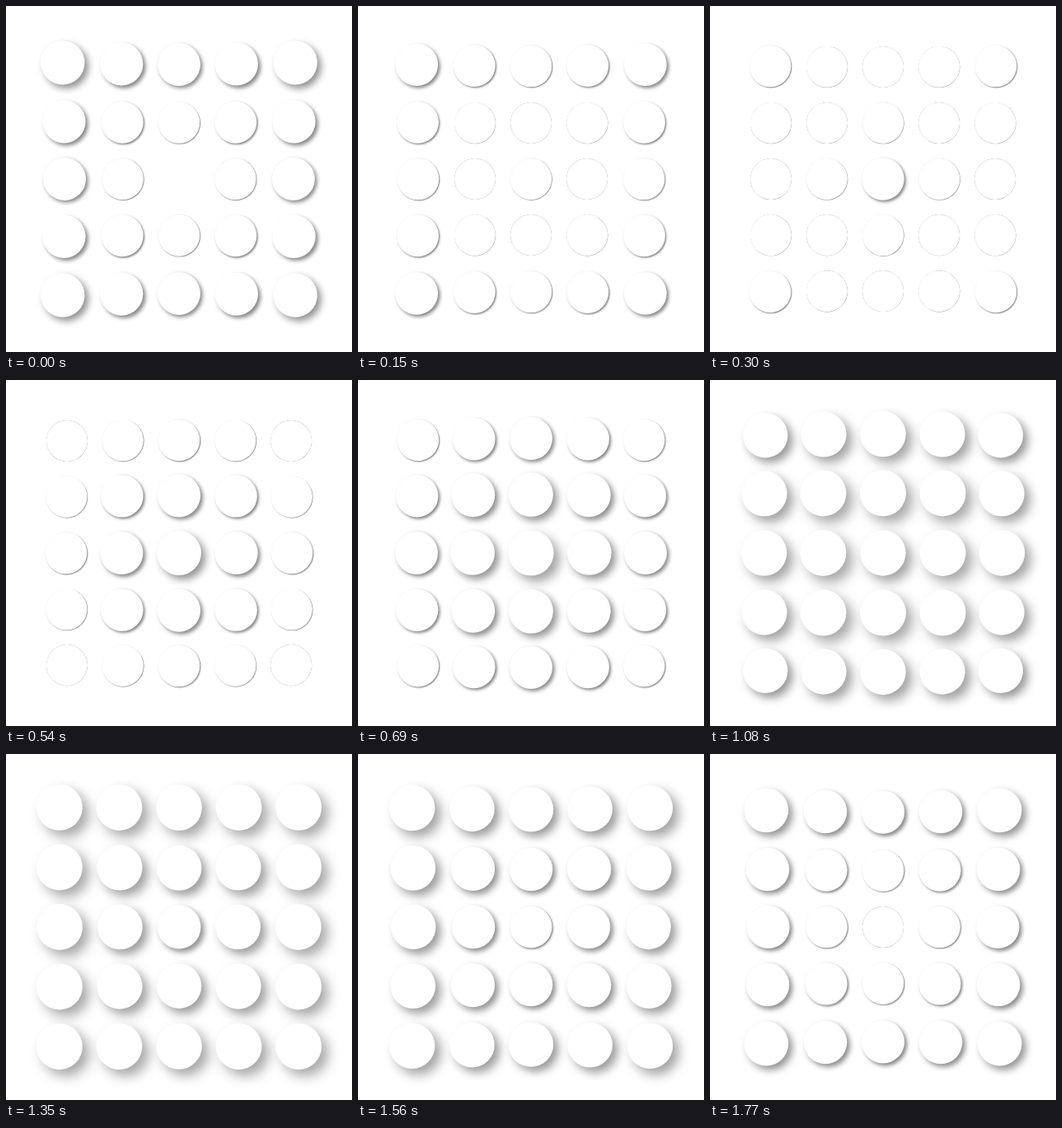
An HTML page with a canvas that plays this animation: 420x420 px, repeating every 1.8 s.

```html
<!DOCTYPE html>
<html lang="en">
<head>
<meta charset="utf-8">
<title>Floating discs</title>
<style>
  html, body { margin: 0; width: 100%; height: 100%; overflow: hidden; background: #fff; }
  canvas { display: block; width: 420px; height: 420px; }
</style>
</head>
<body>
<canvas id="stage" width="420" height="420"></canvas>
<script>
const LOOP = 1800;
const MID = 210;
const GAP = 68;
const DELAY = 172;   // ms per grid unit away from the middle
const FAR = 2000;    // keeps the shadow caster off the stage

const ctx = document.getElementById("stage").getContext("2d");

const cells = [];
for (let row = -2; row <= 2; row++) {
  for (let col = -2; col <= 2; col++) {
    cells.push({ col, row, delay: Math.hypot(col, row) * DELAY });
  }
}

// Height of a disc above the ground, 0 to 1.
function lift(time, delay) {
  return (1 - Math.cos((time - delay) / LOOP * 2 * Math.PI)) / 2;
}

function place({ col, row, delay }, time) {
  const z = lift(time, delay);
  const step = GAP + 4.6 * z;
  return { x: MID + col * step, y: MID + row * step, r: 25 + 3 * z, z };
}

function disc(x, y, r) {
  ctx.beginPath();
  ctx.arc(x, y, r, 0, 2 * Math.PI);
  ctx.fill();
}

function shadow({ x, y, r, z }) {
  if (z < 0.001) return;
  ctx.shadowColor = `rgba(0, 0, 0, ${0.55 - 0.2 * z})`;
  ctx.shadowBlur = 15 * z;
  ctx.shadowOffsetX = FAR + 8 * z;
  ctx.shadowOffsetY = 8 * z;
  disc(x - FAR, y, r);
}

function draw(time) {
  const discs = cells.map(cell => place(cell, time));
  ctx.fillStyle = "#fff";
  ctx.fillRect(0, 0, 420, 420);
  ctx.save();
  ctx.fillStyle = "#000";
  discs.forEach(shadow);
  ctx.restore();
  discs.forEach(({ x, y, r }) => disc(x, y, r));
}

let start;
function tick(now) {
  start ??= now;
  draw((now - start) % LOOP);
  requestAnimationFrame(tick);
}
draw(0);
requestAnimationFrame(tick);
</script>
</body>
</html>
```
